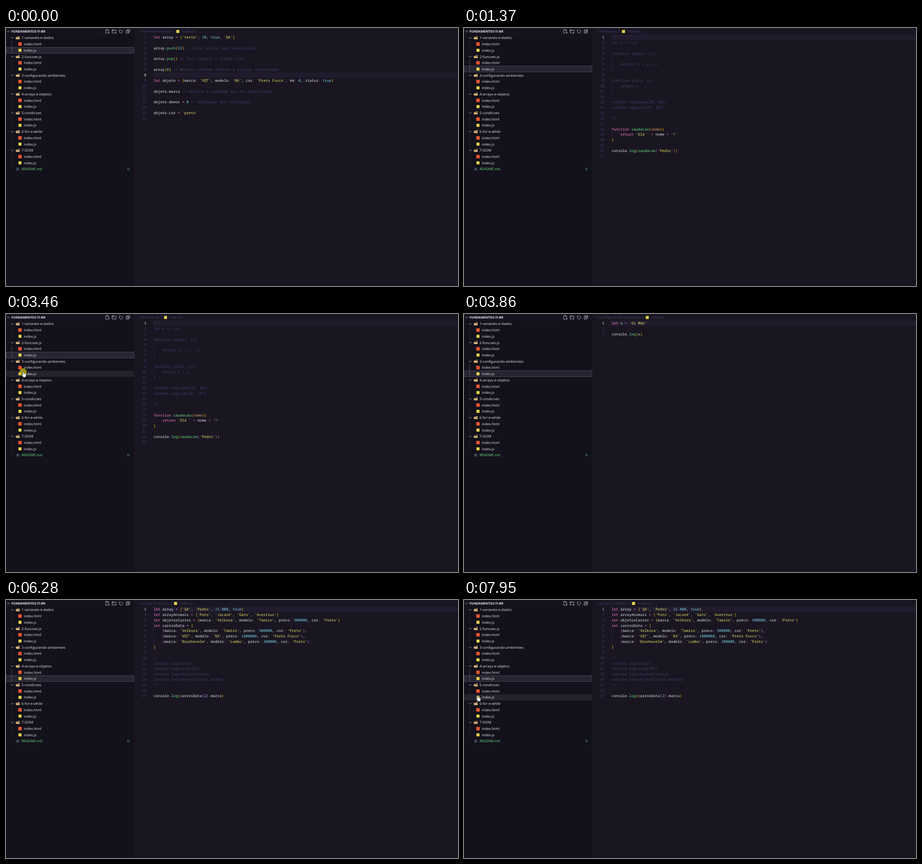
Recreate the animation shown at these times as an HTML page. Size 989 by 566 pixels, loop 8 s.

```html
<!DOCTYPE html>
<html lang="pt">
<head>
<meta charset="utf-8">
<title>Editor</title>
<style>
  html, body { margin: 0; width: 100%; height: 100%; overflow: hidden; background: #191622; }
  svg { display: block; }
  text { font: 7.78px "Open Sans", "Noto Sans", sans-serif; fill: #e6e6eb;
         white-space: pre; text-rendering: geometricPrecision; }
  .title { font-size: 7px; font-weight: 700; }
  .mono { font: 8.008px "Noto Sans Mono", "DejaVu Sans Mono", monospace; }
  .line { fill: none; stroke: #d5d5da; stroke-width: .8; }
  .dim { fill: #483c67; }
  .line.dim { fill: none; stroke: #483c67; }
  .key { fill: #ff79c6; }
  .str { fill: #ece567; }
  .num { fill: #78d1e1; }
  .fn { fill: #67e480; }
  .arg { fill: #e89e64; font-style: italic; }
  .b0 { fill: #ffd700; }
  .b1 { fill: #da70d6; }
  .b2 { fill: #179fff; }
</style>
</head>
<body>
<svg id="stage" width="989" height="566" viewBox="0 0 989 566"></svg>
<script>
const LOOP = 8000;
const ROW = 13.72, ROW_TOP = 14.6;
const LINE = 11.856, LINE_TOP = 14.4, CODE_X = 323;
const rowY = i => ROW_TOP + ROW * i;
const jsRow = i => 2 + 3 * i;

const folders = ['1-variaveis-e-dados', '2-funcoes-js', '3-configurando-ambientes',
  '4-arrays-e-objetos', '5-condicoes', '6-for-e-while', '7-DOM'];

// crumbEnd: right edge of the folder name in the breadcrumb
const files = [
  { crumbEnd: 362, active: 8, code: `let array = ['texto', 10, true, 'QA']

array.push(33) // Para incluir uma nova posição.

array.pop() // Para retirar o último item.

array[0] // Mostra conteúdo refente a posição selecionada.

let objeto = {marca: 'VQT', modelo: 'N6', cor: 'Preto Fosco', km: 0, status: true}

objeto.marca // Retorna o conteúdo que foi selecionado.

objeto.donos = 0 // Adicionar uma informação.

objeto.cor = 'preto'
` },
  { crumbEnd: 335, active: 1, code: `/*
let n = 'Luz'

function soma(x, y){

    return [x + y, n]
}

function sub(x, y){
    return x - y
}

console.log(soma(20, 10))
console.log(sub(20, 10))

*/

function saudacao(nome){
    return 'Olá ' + nome + '!'
}

console.log(saudacao('Pedro'))
` },
  { crumbEnd: 387, active: 1, code: `let x = 'Oi Mãe'

console.log(x)` },
  { crumbEnd: 357, active: 1, code: `let array = ['QA', 'Pedro', 15.000, true]
let arrayAnimais = ['Pato', 'Jacaré', 'Gato', 'Avestruz']
let objetosCarros = {marca: 'Velkora', modelo: 'Tamiro', preco: 900000, cor: 'Preto'}
let carrosData = [
    {marca: 'Velkora', modelo: 'Tamiro', preco: 900000, cor: 'Preto'},
    {marca: 'VQT', modelo: 'N3', preco: 1000000, cor: 'Preto Fosco'},
    {marca: 'Brunhavelm', modelo: 'Lumbo', preco: 200000, cor: 'Preto'}
]

/*
console.log(array)
console.log(array[0])
console.log(objetosCarros)
console.log(objetosCarros.modelo)
*/

console.log(carrosData[2].marca)` }
];

// Each visit: pointer enters, rests, clicks, drifts down and hides.
const visits = [
  { from: [60, 120], to: [44.5, 88.5], start: 500, end: 840, steps: 6, click: 1030, hide: 1370 },
  { from: [42, 140], to: [37.5, 125.5], start: 2840, end: 3180, steps: 6, click: 3460, hide: 3860 },
  { from: [40, 166.5], to: [32, 167.5], start: 5260, end: 5670, steps: 7, click: 5810, hide: 6280 },
  { from: [34, 196], to: [30, 209], start: 7550, end: 7950, steps: 7, click: Infinity, hide: LOOP }
];
const OPEN_DELAY = 120, SELECT_DELAY = 260, DRIFT = 15;

const text = (x, y, s, cls = '', extra = '') => `<text x="${x}" y="${y}" class="${cls}" ${extra}>${s}</text>`;
const rect = (x, y, w, h, fill, extra = '') => `<rect x="${x}" y="${y}" width="${w}" height="${h}" fill="${fill}" ${extra}/>`;
const line = (d, cls = '') => `<path class="line ${cls}" d="${d}"/>`;
const square = (x, y, size, fill) => rect(x - size / 2, y - size / 2, size, size, fill);
const chevronDown = (x, y) => line(`M${x - 2.9} ${y - 1.4}l2.9 2.9 2.9-2.9`);
const chevronRight = (x, y) => line(`M${x - 1.4} ${y - 2.8}l2.8 2.8-2.8 2.8`, 'dim');

function folderIcon(x, y) {
  return `<path transform="translate(${x} ${y}) scale(.3125)" fill="#dcb67a" fill-rule="evenodd"
    d="M27.4 5.5H18.2L16.1 9.7H4.3V13.7H.5L4.3 26.5H29.5V5.5ZM27.4 11.8V17.5L25.7 13.7H6.6V11.8ZM19.2 9.7l1-2.1h7.1v2.1Z"/>`;
}

function sidebar() {
  let out = chevronDown(5.5, 7.5) + text(12, 10, 'FUNDAMENTOS-TI-BR', 'title');
  out += line('M222 11.6H218.2V3h4l2.7 2.7V7M222 3v2.9h2.9M222.6 10.2h4.2M224.7 8.1v4.2');
  out += line('M236.6 11H232.3V3.5h3.2l1.1 1.3h4.8V7M232.3 6.2h3.4l1-1.3M237.4 10.2h4.2M239.5 8.1v4.2');
  out += line('M249.6 4.4a3.7 3.7 0 1 0 3.2-.4M248 3.6l1.9.6-.5 2');
  out += line('M263 5.7h5.5v5.5H263ZM265 5.6V3.5h5.4v5.4h-1.8M264.3 8.4h2.9');
  folders.forEach((name, i) => {
    const [top, html, js] = [0, 1, 2].map(k => rowY(3 * i + k) + ROW / 2);
    out += chevronDown(13.6, top) + folderIcon(20.7, top - 5) + text(34, top + 2.9, name);
    out += square(30.6, html, 7.6, '#e4562f') + text(39, html + 2.9, 'index.html');
    out += square(30.6, js, 6.6, '#e8d44d') + text(39, js + 2.9, 'index.js');
  });
  const y = rowY(21) + ROW / 2;
  return out + square(25.6, y, 6, '#3d4a5c') +
    text(34, y + 2.9, 'README.md', 'fn') + text(265, y + 2.9, 'U', 'fn');
}

const guides = folders.map((_, i) => rect(12, rowY(3 * i + 1), .7, 2 * ROW, '#2d2a3a')).join('');

const TOKEN = /(\/\/.*)|('[^']*')|\b(let|function|return)\b|\b(true|\d+(?:\.\d+)?)\b|((?<=function \w+\()\w+)|(\w+(?=\())|([=+:])|[()[\]{}]/g;
const CLASSES = ['dim', 'str', 'key', 'num', 'arg', 'fn', 'key'];

function editor({ crumbEnd: end, active, code }, i) {
  let out = rect(CODE_X - 1, LINE_TOP + LINE * (active - 1), 667, LINE, '#201b2d');
  out += text(291, 10.3, folders[i], 'dim') + chevronRight(end + 5, 7.6) +
    square(end + 14, 7.6, 6.6, '#e8d44d') + text(end + 23, 10.3, 'index.js', 'dim') +
    chevronRight(end + 55, 7.6) + text(end + 59.5, 10.3, '...', 'dim');
  let depth = 0, inComment = false;
  const paint = (token, ...groups) => {
    const kind = groups.slice(0, CLASSES.length).findIndex(g => g !== undefined);
    let cls = CLASSES[kind];
    if (!cls) cls = 'b' + ('([{'.includes(token) ? depth++ : --depth) % 3;
    return `<tspan class="${cls}">${token}</tspan>`;
  };
  const lines = code.split('\n');
  lines.forEach((src, n) => {
    const top = LINE_TOP + LINE * n, base = top + 8.6;
    out += text(307, base, n + 1, n + 1 === active ? 'mono' : 'mono dim', 'text-anchor="end"');
    const indented = /^ {4}/;
    if (indented.test(src) || (!src && indented.test(lines[n + 1] || '')))
      out += rect(CODE_X, top, .7, LINE, '#352d4a');
    if (src === '/*') inComment = true;
    out += text(CODE_X, base, inComment ? src : src.replace(TOKEN, paint), inComment ? 'mono dim' : 'mono');
    if (src === '*/') inComment = false;
  });
  return `<g class="file">${out}</g>`;
}

const hand = `<path fill="#fff" stroke="#111" stroke-width=".7" stroke-linejoin="round"
  d="M-1.2 1.2Q0-.7 1.2 1.2V5Q2.4 4 3.2 5.3 4.4 4.6 5 5.9 6.4 5.5 6.5 7V9.6Q6.3 11.4 5.2 12.2V13.6H-.3V12.2Q-1.6 10.9-3 8.4-3.5 6.9-2.2 7.1L-1.2 8.2Z"/>`;

const stage = document.getElementById('stage');
stage.innerHTML =
  rect(0, 0, 989, 566, '#191622') + rect(0, 0, 280.7, 566, '#13111b') + rect(0, 0, 280.7, ROW_TOP, '#16131f') +
  rect(0, 0, 280.3, ROW, '#24222d', 'id="hover"') +
  rect(.35, .35, 279.6, ROW - .7, '#272531', 'id="selected" stroke="#5a5570" stroke-width=".7"') +
  guides + rect(12, 0, .7, 2 * ROW, '#69657a', 'id="guide"') +
  sidebar() + files.map(editor).join('') + rect(0, 565, 989, 1, '#13111b') +
  `<g id="pointer"><circle id="ring" cx="0" cy="1.3" r="7.6" fill="#b5aa0c" fill-opacity=".85"/>${hand}</g>`;

const [hover, selected, guide, pointer, ring] =
  ['hover', 'selected', 'guide', 'pointer', 'ring'].map(id => document.getElementById(id));
const panes = stage.querySelectorAll('.file');
const show = (el, on) => el.setAttribute('display', on ? 'inline' : 'none');
const place = (el, x, y) => el.setAttribute('transform', `translate(${x} ${y})`);

function pointerAt(v, t) {
  const last = v.steps - 1;
  const step = Math.min(last, Math.floor((t - v.start) / (v.end - v.start) * last + .1));
  const p = 1 - (1 - step / last) ** 2;
  const leave = v.click + SELECT_DELAY;
  const drift = t < leave ? 0 : DRIFT * Math.min(1, (t - leave + 35) / (v.hide - leave));
  return [v.from[0] + (v.to[0] - v.from[0]) * p, v.from[1] + (v.to[1] - v.from[1]) * p + drift];
}

function draw() {
  const t = performance.now() % LOOP;
  const passed = delay => visits.filter(v => t >= v.click + delay).length;
  const open = passed(OPEN_DELAY), chosen = passed(SELECT_DELAY);
  panes.forEach((pane, i) => show(pane, i === open));
  place(selected, 0, rowY(jsRow(chosen)));
  place(guide, 0, rowY(jsRow(chosen) - 1));

  const visit = visits.find(v => t >= v.start && t < v.hide);
  show(pointer, visit);
  show(hover, visit);
  if (visit) {
    const [x, y] = pointerAt(visit, t);
    place(pointer, x, y);
    place(hover, 0, rowY(Math.floor((y - ROW_TOP) / ROW)));
    show(ring, t >= visit.click && t < visit.click + OPEN_DELAY);
  }
  requestAnimationFrame(draw);
}
draw();
</script>
</body>
</html>
```
